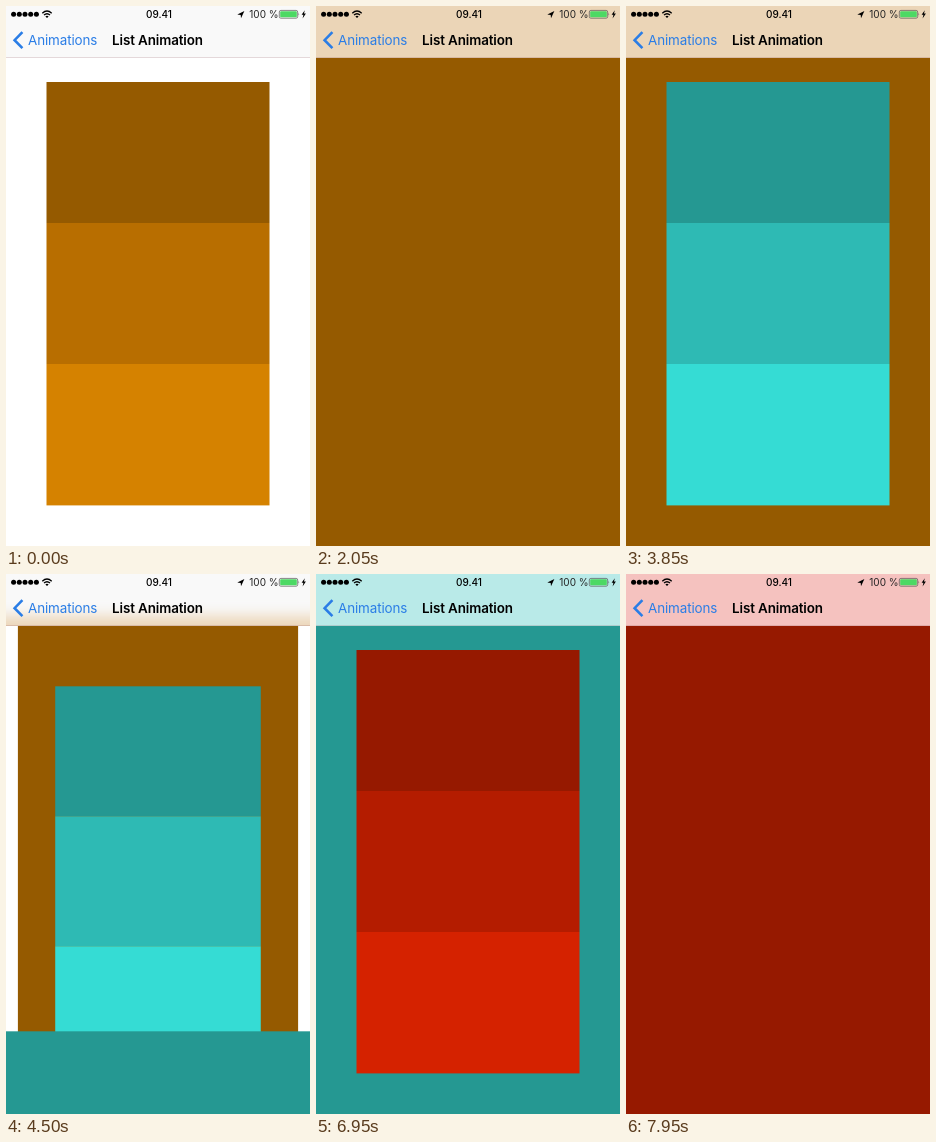
Write an HTML page that moves like this. It is 304x540 px and loops after 8000 ms.

```html
<!DOCTYPE html>
<html lang="en">
<head>
<meta charset="utf-8">
<title>List Animation</title>
<style>
  html, body { margin: 0; width: 100%; height: 100%; overflow: hidden; background: #fff; }
  svg { display: block; width: 100%; height: 100%; }
  text { font-family: Inter, Roboto, sans-serif; }
</style>
</head>
<body>
<svg viewBox="0 0 304 540">
  <defs>
    <clipPath id="bar"><rect width="304" height="52"/></clipPath>
    <filter id="blur" filterUnits="userSpaceOnUse" x="-80" y="-100" width="464" height="760">
      <feGaussianBlur stdDeviation="7"/>
    </filter>
  </defs>
  <rect width="304" height="540" fill="#fff"/>
  <g id="pages"></g>

  <g clip-path="url(#bar)">
    <rect width="304" height="52" fill="#f9f9f9"/>
    <g id="tints"></g>
    <rect y="51" width="304" height="1" fill="#783038" fill-opacity=".16"/>
  </g>

  <g id="dots"></g>
  <g fill="none" stroke="#000" stroke-width="1.3">
    <path d="M36.3 7.2Q41 2.8 45.7 7.2"/>
    <path d="M38 9.1Q41 6.3 44 9.1"/>
  </g>
  <path d="M39.4 10.4Q41 9 42.6 10.4L41 12Z"/>
  <text x="153" y="11.8" font-size="10" font-weight="500" text-anchor="middle">09.41</text>
  <path d="M231.3 8.6L238.4 5L235 12.2L234.7 8.9Z"/>
  <text x="243.3" y="11.8" font-size="10" fill="#222">100 %</text>
  <rect x="273.3" y="4.4" width="18.4" height="7.8" rx="1.6" fill="none" stroke="#555" stroke-width=".7"/>
  <rect x="274.2" y="5.3" width="16.6" height="6" rx=".8" fill="#4cd964"/>
  <path d="M292.6 7q1.2 1.3 0 2.6Z" fill="#444"/>
  <path d="M298.8 4.2L295.6 8.8H297.4L296.6 12.4L299.9 7.6H298Z"/>

  <path d="M16.4 26.2L8.6 34.2L16.4 42.2" fill="none" stroke="#2a7de6" stroke-width="2.6"/>
  <text x="22" y="38.8" font-size="13.4" letter-spacing="-.1" fill="#2a7de6">Animations</text>
  <text x="106" y="38.8" font-size="13.4" font-weight="600" letter-spacing="-.1">List Animation</text>
</svg>

<script>
const W = 304, H = 540, LOOP = 8000, STEP = 50;
const SLIDE = 460, ROW = 128, ROW_W = 223, ROW_H = 141;

// in: slide-up start, list: first row start, out: start of shrinking
const pages = [
  { bg: '#ffffff', tint: '#f9f9f9', rows: ['#955a00', '#b86e00', '#d58200'], in: -9e3, list: -9e3, out: 925, pivot: 270 },
  { bg: '#955a00', tint: '#ebd5b7', rows: ['#259892', '#2ebab4', '#35dcd4'], in: 925, list: 2423, out: 4320, pivot: 540 },
  { bg: '#259892', tint: '#b9eae8', rows: ['#961900', '#b41c00', '#d52200'], in: 4320, list: 5821, out: 7325, pivot: 540 },
  { bg: '#961900', tint: '#f5c2bf', rows: [], in: 7325, list: 9e3, out: 9e3, pivot: 540 }
];

const byId = id => document.getElementById(id);
const progress = (t, start, span) => Math.min(1, Math.max(0, (t - start) / span));

function add(parent, tag, attrs = {}) {
  const el = document.createElementNS('http://www.w3.org/2000/svg', tag);
  set(el, attrs);
  parent.appendChild(el);
  return el;
}

function set(el, attrs) {
  for (const key in attrs) el.setAttribute(key, attrs[key]);
}

for (let i = 0; i < 5; i++) add(byId('dots'), 'circle', { cx: 7.6 + i * 5.7, cy: 8.2, r: 2.5 });

for (const page of pages) {
  page.group = add(byId('pages'), 'g');
  add(page.group, 'rect', { width: W, height: H, fill: page.bg });
  page.bars = page.rows.map((fill, i) =>
    add(page.group, 'rect', { x: 40.5, y: 76 + i * ROW_H, height: ROW_H + (i === 2 ? 0.4 : 0), fill }));
  page.shade = add(byId('tints'), 'rect', { x: -60, width: W + 120, fill: page.tint, filter: 'url(#blur)' });
}

function draw(t) {
  for (const page of pages) {
    const enter = progress(t, page.in, SLIDE) ** 2;
    const leave = progress(t, page.out, SLIDE);
    const scale = 1 - 0.2 * leave;
    const top = H * (1 - enter) + page.pivot * (1 - scale);
    const shown = enter > 0 && leave < 1 ? 'inline' : 'none';

    set(page.group, {
      display: shown,
      transform: `translate(${W / 2 * (1 - scale)} ${top}) scale(${scale})`
    });
    page.bars.forEach((bar, i) =>
      set(bar, { width: ROW_W * progress(t, page.list + i * ROW, ROW) }));

    // The blur runs past the screen edge once the page reaches the top
    const y = top - 60 * Math.max(0, 1 - top / 30);
    set(page.shade, { display: shown, y, height: H + 100 });
  }
}

function tick() {
  const t = performance.now() % LOOP;
  draw(Math.floor(t / STEP) * STEP);
  requestAnimationFrame(tick);
}
tick();
</script>
</body>
</html>
```
